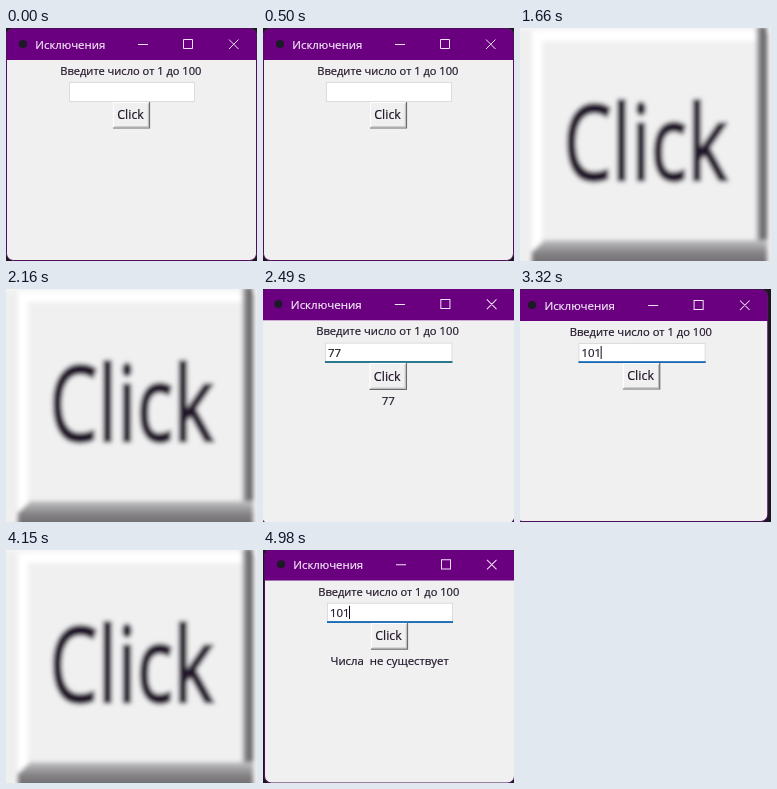
Recreate the animation shown at these times as an HTML page. Size 251x233 px, loop 5.81 s.

```html
<!DOCTYPE html>
<html lang="ru">
<head>
<meta charset="utf-8">
<title>Исключения</title>
<style>
  html, body { margin: 0; width: 100%; height: 100%; overflow: hidden; background: #1d1522; }
  svg { display: block; width: 251px; height: 233px; }
  text { font-family: "Open Sans", "Noto Sans", sans-serif; font-size: 11.4px; fill: #211629; stroke: #211629; stroke-width: .2; white-space: pre; }
  .title { fill: #f6eaf8; stroke: #f6eaf8; }
  .label { font-size: 11.1px; }
  .button { font-size: 12.4px; }
</style>
</head>
<body>
<svg viewBox="0 0 251 233" xmlns="http://www.w3.org/2000/svg">
  <defs>
    <clipPath id="frame"><rect x=".5" y=".5" width="250" height="232" rx="7"/></clipPath>
    <filter id="soft" x="-10%" y="-10%" width="120%" height="120%"><feGaussianBlur stdDeviation="2"/></filter>
    <linearGradient id="side"><stop stop-color="#c8c8ca"/><stop offset=".4" stop-color="#7a787b"/><stop offset="1" stop-color="#5f5d61"/></linearGradient>
    <linearGradient id="base" x2="0" y2="1"><stop stop-color="#c2c2c4"/><stop offset=".5" stop-color="#858386"/><stop offset="1" stop-color="#68666a"/></linearGradient>
  </defs>

  <g id="app">
    <g clip-path="url(#frame)">
      <rect width="251" height="233" fill="#f0f0f0"/>
      <rect width="251" height="32" fill="#6a0080"/>
    </g>
    <rect x=".5" y=".5" width="250" height="232" rx="7" fill="none" stroke="#4b1059"/>
    <circle cx="17" cy="16" r="4" fill="#1c1a26"/>
    <text class="title" x="29.3" y="20.8">Исключения</text>
    <path d="M132 16.5h10M177.5 11.5h9v9h-9zM223 11.5l9.5 9.5M232.5 11.5l-9.5 9.5" fill="none" stroke="#f1e3f4"/>

    <text class="label" x="54.3" y="47">Введите число от 1 до 100</text>
    <rect x="63.5" y="54.5" width="125" height="19" fill="#fff" stroke="#dcdcde"/>
    <rect id="focus" x="63" y="72.2" width="126" height="1.8"/>
    <text id="entry" x="66" y="68"></text>
    <path id="caret" stroke="#111"/>

    <rect x="107" y="74" width="37" height="26.5" fill="#f0f0f0"/>
    <path d="M107.5 100V74.5H143" fill="none" stroke="#fff"/>
    <path d="M107 100h36.5V74" fill="none" stroke="#6e6a70" stroke-width="1.2"/>
    <path d="M108.5 98.8h33.8V75.5" fill="none" stroke="#b3b0b5" stroke-width=".8"/>
    <text class="button" x="111.3" y="91.4">Click</text>
    <text id="result" x="125.6" y="115.5" text-anchor="middle"></text>
  </g>

  <g id="close">
    <rect width="251" height="233" fill="#efeff0"/>
    <g filter="url(#soft)">
      <path d="M12 -9H238V221H12z" fill="#fff"/>
      <rect x="-9" y="-9" width="270" height="12" fill="#f4f4f5"/>
      <rect x="22" y="13" width="214" height="200" fill="#f0f0f1"/>
      <rect x="236" y="-2" width="11" height="240" fill="url(#side)"/>
      <path d="M24 212H247V238H12V224z" fill="url(#base)"/>
      <text class="button" transform="translate(43.2 152) scale(6.2 8.4)" style="stroke-width:.35">Click</text>
    </g>
  </g>
</svg>
<script>
  const STEP = 830, BLUE = "#1267b3";
  const el = id => document.getElementById(id);
  const [app, close, focus, entry, caret, result] =
    ["app", "close", "focus", "entry", "caret", "result"].map(el);

  // view: x scale, y scale, x shift, y shift of the window; null is the button close-up
  const closeUp = { view: null };
  const scenes = [
    { view: [1, 1, 0, 0] },
    { view: [1.018, 1.015, -3.7, -1.8], entry: "77", line: BLUE, caret: 78.5 },
    closeUp,
    { view: [1.012, 1.015, -1.8, -1.2], entry: "77", line: "#1b6e86", result: "77" },
    { view: [1.01, 1, -5.2, 0], entry: "101", line: BLUE, caret: 85 },
    closeUp,
    { view: [1, 1.01, 1, -1.8], entry: "101", line: BLUE, caret: 85, result: "Числа  не существует" }
  ];

  function draw(ms) {
    const s = scenes[Math.floor(ms / STEP) % scenes.length];
    app.style.display = s.view ? "" : "none";
    close.style.display = s.view ? "none" : "";
    if (!s.view) return;
    const [sx, sy, dx, dy] = s.view;
    app.setAttribute("transform", `matrix(${sx} 0 0 ${sy} ${dx} ${dy})`);
    focus.setAttribute("fill", s.line || "none");
    entry.textContent = s.entry || "";
    result.textContent = s.result || "";
    caret.setAttribute("d", s.caret ? `M${s.caret + 0.5} 57v13` : "");
  }

  const start = performance.now();
  function tick() {
    draw(performance.now() - start);
    requestAnimationFrame(tick);
  }
  draw(0);
  requestAnimationFrame(tick);
</script>
</body>
</html>
```
